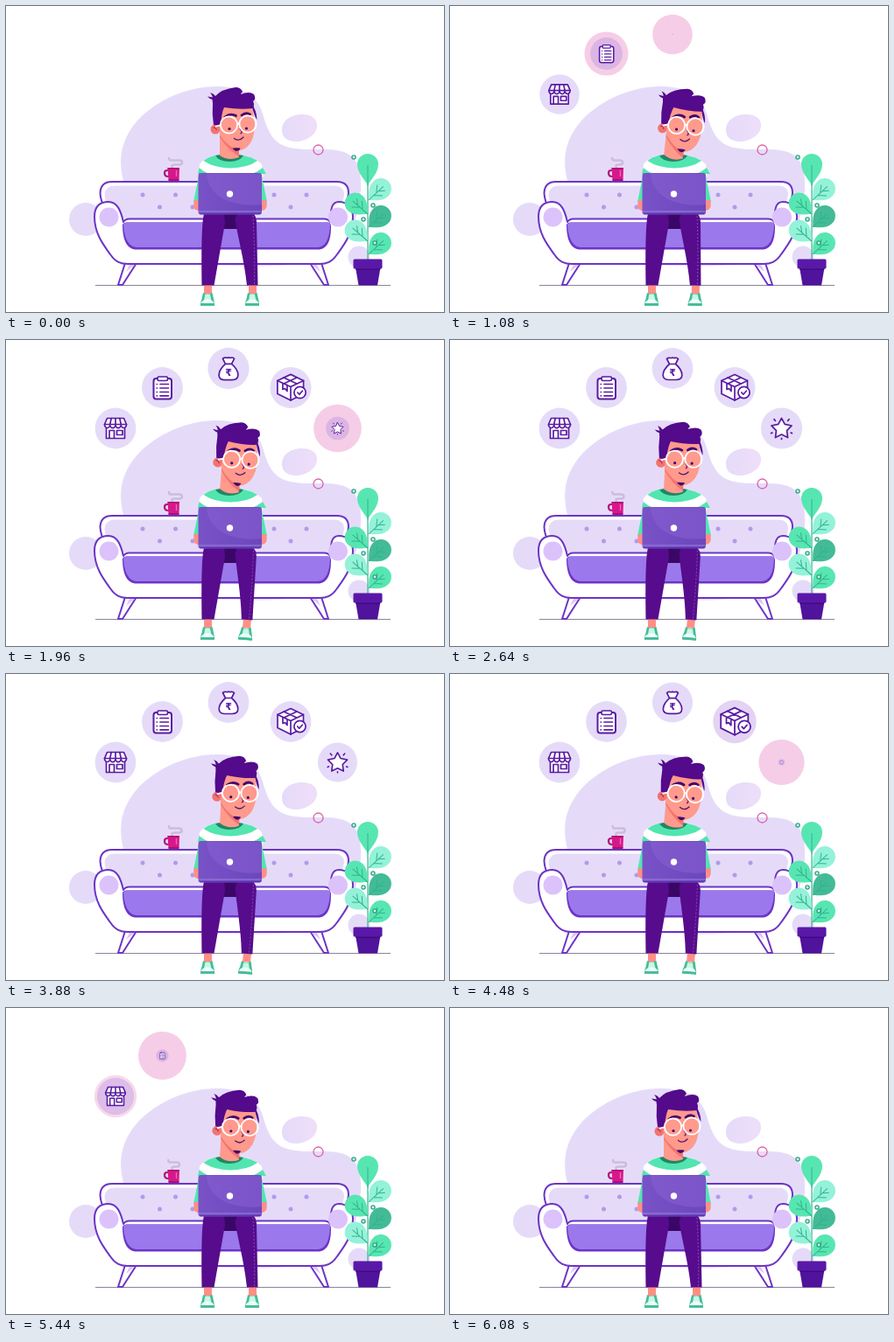
Write an HTML page that moves like this. It is 500x350 px and loops after 6120 ms.

```html
<!DOCTYPE html>
<html lang="en">
<head>
<meta charset="utf-8">
<title>Working from the sofa</title>
<style>
html, body { margin: 0; width: 100%; height: 100%; overflow: hidden; background: #fff; }
svg { display: block; width: 500px; height: 350px; }
.line { fill: none; stroke: #5a1ba3; stroke-width: 1.7; stroke-linecap: round; stroke-linejoin: round; }
.paper { fill: #fff; }
.sofa { fill: #fff; stroke: #6c34c6; stroke-width: 2; stroke-linejoin: round; }
</style>
</head>
<body>
<svg viewBox="0 0 500 350" xmlns="http://www.w3.org/2000/svg">
  <defs>
    <linearGradient id="cloud"><stop stop-color="#e5dbf9"/><stop offset="1" stop-color="#efdef9"/></linearGradient>
    <linearGradient id="lid"><stop stop-color="#7852c6"/><stop offset="1" stop-color="#6c47bc"/></linearGradient>
    <g id="store" class="line">
      <path class="paper" d="M-10.5-3V11.5H10.5V-3Z"/>
      <path class="paper" d="M-9.5-11.5H9.5L12.5-4.5a3.1 4 0 0 1-6.2 0a3.1 4 0 0 1-6.3 0a3.1 4 0 0 1-6.3 0a3.1 4 0 0 1-6.2 0Z"/>
      <path d="M-4.8-11.500L-6.300-4.500M0-11.500V-4.500M4.800-11.500L6.300-4.500M-12.500-4.500H12.500M-7 11V2.500H-1.500V11M1.500 2.500H8V7.500H1.500Z"/>
    </g>
    <g id="clipboard" class="line">
      <rect class="paper" x="-10" y="-10.500" width="20.500" height="23.500" rx="3" stroke-width="2"/>
      <rect class="paper" x="-5.500" y="-12.500" width="11.500" height="4.500" rx="1.500"/>
      <path d="M-2.500-4H7M-2.500 .5H7M-2.500 5H7M-2.500 9.300H7M-6.300-4h.2M-6.300 .5h.2M-6.300 5h.2M-6.300 9.300h.2"/>
    </g>
    <g id="bag">
      <path class="line paper" d="M-3.500-5C-8-1-11 3-10.800 8C-10.500 12-7 13-4 13H4C8 13 10.800 11 10.800 7.500C10.800 2 7-2 3.500-5ZM-3.500-5L-6.500-11C-3-14-2-10.500 0-12.500C2-10.500 4-14 6.500-11L3.500-5Z"/>
      <text y="8.500" text-anchor="middle" font-family="'DejaVu Sans', sans-serif" font-size="11" font-weight="bold" fill="#5a1ba3">₹</text>
    </g>
    <g id="box" class="line">
      <path class="paper" d="M-15-8L0-15L14.500-8V7L0 14.500L-15 7Z"/>
      <path d="M-15-8L0-1L14.500-8M0-1V14.500M-8-11.500L7-4.500M-8-4.500L7-11.500M-9-5V2l2.500-1 2.500 3V-3"/>
      <circle class="paper" cx="10.500" cy="5.500" r="6.600"/>
      <path d="M7.800 5.500l2 2.200L13.300 3.700"/>
    </g>
    <g id="star" class="line">
      <path class="paper" d="M0-11.500L3.700-4.600L11.500-3L6 2.600L7 10.500L0 7L-7 10.500L-6 2.600L-11.500-3L-3.700-4.600Z"/>
      <path d="M-7-8.500l-1.500-1.800M7-8.500l1.500-1.800M-10.500 5l-1.300.6M10.500 5l1.300.6M0 11.300v1"/>
    </g>
    <path id="longLeaf" d="M0 0C-3-6-12-14-12-24A12 12 0 0 1 12-24C12-14 3-6 0 0Z"/>
    <path id="leaf" d="M0 0C-3-4-12-9-12-19A12 12 0 0 1 12-19C12-9 3-4 0 0Z"/>
    <path id="vein" d="M0 0V-23M0-8L7-15M0-12L-6-19M0-15L5-21" fill="none" stroke="#32b38d" stroke-width="1"/>
    <g id="sofaSide">
      <path class="sofa" d="M136 294L128 319H133L149 294Z"/>
      <path d="M141 296L137 304L147 296Z" fill="#dcc5fa"/>
    </g>
    <g id="shoe">
      <path d="M-4-10H5V0H-4Z" fill="#ff8f86"/>
      <path d="M-5-1Q0 2 5.500-1L7 6Q8 9 8 13.500H-8Q-8 9-6.500 6Z" fill="#42bd97"/>
      <path d="M-2.800 1H3L4.500 8H-4Z" fill="#c9f7e6"/>
      <path d="M-7.500 11Q-6 6.500 0 6.500Q6 6.500 7.500 11Z" fill="#eefff9"/>
      <path d="M-8 11H8V13.800H-8Z" fill="#42bd97"/>
    </g>
  </defs>

  <g fill="#e5dbf9">
    <path d="M134 200C127 172 133 150 151 130C174 106 210 91 243 92C275 93 288 106 293 123C300 148 307 160 330 163C352 166 372 161 388 168C403 175 406 191 405 211C403 236 396 258 384 276C360 300 300 298 250 297C190 295 146 250 134 200Z"/>
    <circle cx="91" cy="244" r="19"/>
    <circle cx="403" cy="287" r="12.500"/>
    <path d="M315 142C315 131 325 124 338 124C350 124 356 130 355 138C354 148 342 155 331 155C321 155 315 150 315 142Z" fill="url(#cloud)"/>
  </g>
  <circle cx="356.500" cy="164.500" r="5.500" fill="none" stroke="#dc62ab" stroke-width="1.300"/>
  <path d="M102 319.500H439" stroke="#88859a"/>

  <path id="steam" fill="none" stroke="#cbbcdd" stroke-width="2.600" stroke-linecap="round"/>
  <path d="M186 188H184Q181 188 181 191Q181 195 185 195H187" fill="none" stroke="#b40f78" stroke-width="2.200"/>
  <path d="M184.500 185H198L197.500 199H185.500Z" fill="#d6188a"/>
  <path d="M184.500 185H198V186.500H184.500ZM185.500 198H197.500V200H185.500Z" fill="#ad0d70"/>
  <path d="M194.500 188V195" stroke="#ef6bb8" stroke-width="1.300"/>

  <use href="#sofaSide"/>
  <use href="#sofaSide" transform="matrix(-1 0 0 1 496 0)"/>
  <path class="sofa" d="M121 201H378Q391 201 391 214Q390 224 384 233V255H114V233Q108 224 107.500 214Q108 201 121 201Z"/>
  <path d="M124 205.500H375Q386 206 386 216Q385 226 378 230V243H120V230Q113 226 112.500 216Q113 206 124 205.500Z" fill="#e5dbf9"/>
  <g id="buttons" fill="#b39ae9"></g>
  <path class="sofa" d="M101 241C101 228 108 224 117 224C127 224 131 234 134 247Q136 243.500 141 243.500H363Q368 243.500 370 247C371 233 371 224 380 224C389 224 396 230 396 241C396 260 386 273 378 284C372 293 366 295 358 295H139C131 295 125 293 119 284C111 273 101 260 101 241Z"/>
  <path d="M133 250Q134 247.500 137 247.500H367Q371 247.500 371 252C371 268 367 278.500 356 278.500H149C138 278.500 133 268 133 250Z" fill="#6c34c6"/>
  <path d="M134 250Q135 247.500 138 247.500H367Q370 247.500 370 251C369 266 365 276 355 276H150C140 276 135 266 134 250Z" fill="#9b78ec"/>
  <g fill="#dcc2fa"><circle cx="117.500" cy="241.500" r="11"/><circle cx="379" cy="241.500" r="11"/></g>

  <g id="plant">
    <path d="M413 185V291" stroke="#32b38d" stroke-width="1.200"/>
  </g>
  <path d="M399 299H427.500L424 319.500H402.500Z" fill="#4f139c"/>
  <path d="M399 300H427.500L427 302H399.400Z" fill="#430a83"/>
  <rect x="396.500" y="289.500" width="33" height="11" rx="1.500" fill="#5a18a8"/>

  <path d="M246 234H268V255H248Z" fill="#3b0766"/>
  <use href="#shoe" transform="translate(230 329)"/>
  <path d="M226 237Q236 232 249 237L250 248L237.500 319.500H223.500C223 290 223 260 225 243Z" fill="#560c8c"/>
  <g id="leg">
    <use href="#shoe" transform="translate(281 329)"/>
    <path d="M261.500 244Q263 235 274 234.500Q285 235 286 246L287.500 319.500H275C272 290 264 262 261.500 244Z" fill="#560c8c"/>
    <path d="M282 240Q284 278 283.500 318" fill="none" stroke="#8e5cc2" stroke-width=".8" stroke-dasharray="2 2"/>
  </g>

  <path d="M221 190L214 224L220 230L225 200ZM291 190L298 224L292 230L287 200Z" fill="#52e5b0"/>
  <path d="M215 222Q212 234 220 234V222ZM297 222Q300 234 291 234V222Z" fill="#ff8f86"/>
  <path d="M238 171Q226 174 221 181L219.500 195H293.500L292 181Q285 174 271 171Q254 178 238 171Z" fill="#fff"/>
  <path d="M238 171Q230 173 225.500 177Q237 185 256 185.500Q276 185 287 177Q281 173 271 171Z" fill="#52e5b0"/>
  <path d="M220.500 185Q225 189 232 192H219ZM293 185Q288 189 281 192H297Z" fill="#52e5b0"/>
  <path d="M239 171Q255 167 271 171Q267 178 255 178Q243 178 239 171Z" fill="#228565"/>

  <g id="head">
    <path d="M244 145V171Q254 178 266 173V158Z" fill="#ff9a8c"/>
    <path d="M244 139V150Q253 164 266 172V160Z" fill="#f3736f"/>
    <circle cx="239" cy="141" r="5.500" fill="#f3736f"/>
    <path d="M236.500 139q3-1 4 3" fill="none" stroke="#8d2a68"/>
    <path d="M243 115H281L284 134Q284 147 280 155Q275 164 266 165.500Q254 162 244 148Z" fill="#ff9a8c"/>
    <path d="M280 111Q286 119 286.500 130Q284 127 281 116Z" fill="#530a8b"/>
    <path d="M237 136Q235 124 236 111L235.500 107Q232 106 230 103.500Q233 104 236 104.500Q235 101 233 99Q237 100 239 103Q246 95 262 93Q268 93 270 98Q268 100 268 101Q278 97 283 101Q286 106 282 109Q284 112 282 117Q268 119 249 116Q246 122 245 137Z" fill="#530a8b"/>
    <path d="M250 127Q256 122 262.500 125.500M269 125Q274 121 278.500 124" fill="none" stroke="#43086f" stroke-width="2.800" stroke-linecap="round"/>
    <g fill="#43086f"><circle cx="255" cy="140.500" r="1.600"/><circle cx="274.500" cy="140" r="1.600"/>
      <path d="M258.500 162.500Q263 162 267.500 162.500Q267 165.500 263 166Q260 165 258.500 162.500Z"/></g>
    <path d="M267 140Q271 145 267.500 146" fill="none" stroke="#7a1674" stroke-width="1.400"/>
    <path d="M260.500 151.500Q266 155.500 271 150" fill="none" stroke="#59106f" stroke-width="1.300" stroke-linecap="round"/>
    <g fill="none" stroke="#fff" stroke-width="1.800">
      <circle cx="254.500" cy="136" r="9.600"/><circle cx="276" cy="135" r="9.600"/>
      <path d="M264 135Q265.300 133.500 266.500 135M245 136L239 138"/>
    </g>
  </g>

  <rect x="219.500" y="191" width="72.500" height="47.500" rx="3" fill="url(#lid)"/>
  <path d="M229 191.500H289Q292 191.500 292 195V227C255 231 230 216 229 191.500Z" fill="#8a63d6" fill-opacity=".5"/>
  <path d="M220 235H291.500" stroke="#9d80e0"/>
  <path d="M221 237.700H290.500" stroke="#5731a8"/>
  <circle cx="255.500" cy="215" r="3.700" fill="#fff"/>

  <g id="bubbles"></g>
</svg>
<script>
const LOOP = 6120;
const MIRROR = 6290; // the bubbles leave as a reversal of their entrance
const $ = id => document.getElementById(id);

function add(parent, tag, attrs) {
  const node = document.createElementNS('http://www.w3.org/2000/svg', tag);
  for (const key in attrs) node.setAttribute(key, attrs[key]);
  return parent.appendChild(node);
}

// Smooth curve through [time, value] keys that never overshoots them.
function track(keys) {
  const slope = i => (keys[i + 1][1] - keys[i][1]) / (keys[i + 1][0] - keys[i][0]);
  const tangent = i => {
    if (i === 0 || i === keys.length - 1) return 0;
    const a = slope(i - 1), b = slope(i);
    return a * b > 0 ? 2 * a * b / (a + b) : 0;
  };
  return t => {
    if (t <= keys[0][0]) return keys[0][1];
    const i = keys.findIndex(key => key[0] > t) - 1;
    if (i < 0) return keys[keys.length - 1][1];
    const [t0, v0] = keys[i], [t1, v1] = keys[i + 1];
    const d = t1 - t0, s = (t - t0) / d, r = 1 - s;
    return v0 * r * r * (1 + 2 * s) + v1 * s * s * (3 - 2 * s)
      + d * s * r * (tangent(i) * r - tangent(i + 1) * s);
  };
}

const pinkRadius = track([[0, 0], [25, 9], [75, 23], [190, 27.5], [290, 27.3], [415, 25], [570, 23]]);
const pinkFade = track([[420, 1], [560, 0]]);
const discRadius = track([[50, 0], [75, .8], [280, 13.3], [415, 18.5], [600, 27.5], [670, 23.6], [715, 22.5], [900, 23.8], [1020, 23.4]]);
const headAngle = track([[80, 0], [650, 3], [1080, 6.5], [1300, 6.8], [1960, 5], [2560, 3], [3720, 3], [4800, 6.6], [5000, 6.6], [5240, 5.5], [5800, 0]]);
const legAngle = track([[940, 0], [1080, .8], [1320, 4.7], [4800, 4.7], [5000, 3.6], [5320, 0]]);

for (const [y, xs] of [[216, [156, 193.5, 306, 343]], [230, [175.5, 213, 325]]])
  for (const cx of xs) add($('buttons'), 'circle', { cx, cy: y, r: 2.5 });

const leaves = [
  [414, 222, 47, '#94f2d9'], [413, 238, -49, '#57e6b2'], [414, 253, 47, '#42bb96'],
  [413, 269, -49, '#94f2d9'], [414, 284, 47, '#57e6b2']
];
add($('plant'), 'use', { href: '#longLeaf', transform: 'translate(413 205)', fill: '#57e6b2' });
add($('plant'), 'path', { d: 'M413 205V182', stroke: '#32b38d' });
for (const [x, y, angle, fill] of leaves) {
  const transform = `translate(${x} ${y}) rotate(${angle})`;
  add($('plant'), 'use', { href: '#leaf', transform, fill });
  add($('plant'), 'use', { href: '#vein', transform });
}
for (const [cx, cy] of [[397, 173], [419, 228], [408, 244], [421, 271]])
  add($('plant'), 'circle', { cx, cy, r: 2.1, fill: '#c9fbea', stroke: '#2d9e80', 'stroke-width': 1.3 });

const bubbles = [
  ['store', 125, 101, 385], ['clipboard', 178.5, 54.5, 668], ['bag', 254, 32.5, 1008],
  ['box', 325, 54.5, 1290], ['star', 378.5, 101, 1680]
].map(([icon, x, y, start]) => {
  const group = add($('bubbles'), 'g', { transform: `translate(${x} ${y})` });
  const pink = add(group, 'circle', { fill: '#f6cde6' });
  const disc = add(group, 'g', {});
  const face = add(disc, 'circle', { r: 23.4 });
  add(disc, 'use', { href: '#' + icon });
  return { group, pink, disc, face, start };
});

function mixDisc(k) {
  const from = [229, 219, 249], to = [219, 181, 227];
  return `rgb(${from.map((c, i) => Math.round(c + (to[i] - c) * k))})`;
}

function drawSteam(t) {
  const wide = (1 + Math.cos(t / 2040 * 2 * Math.PI)) / 2;
  const right = 197 + 4 * wide, left = 185 + wide;
  $('steam').setAttribute('d',
    `M190 185Q188 181.500 192 181.500H${right - 3}C${right + 1} 181.500 ${right + 1} 176.500 ${right - 3} 176.500H189Q${left} 177 ${left} 174`);
}

function draw(t) {
  for (const b of bubbles) {
    const u = Math.min(t, MIRROR - t) - b.start;
    b.group.setAttribute('visibility', u > 0 ? 'visible' : 'hidden');
    b.pink.setAttribute('r', pinkRadius(u));
    b.pink.setAttribute('opacity', pinkFade(u));
    b.disc.setAttribute('transform', `scale(${discRadius(u) / 23.4})`);
    b.face.setAttribute('fill', mixDisc(pinkFade(u)));
  }
  $('head').setAttribute('transform', `rotate(${headAngle(t)} 252 172)`);
  $('leg').setAttribute('transform', `rotate(${legAngle(t)} 273 245)`);
  drawSteam(t);
}

const began = performance.now();
function tick() {
  draw((performance.now() - began) % LOOP);
  requestAnimationFrame(tick);
}
tick();
</script>
</body>
</html>
```
